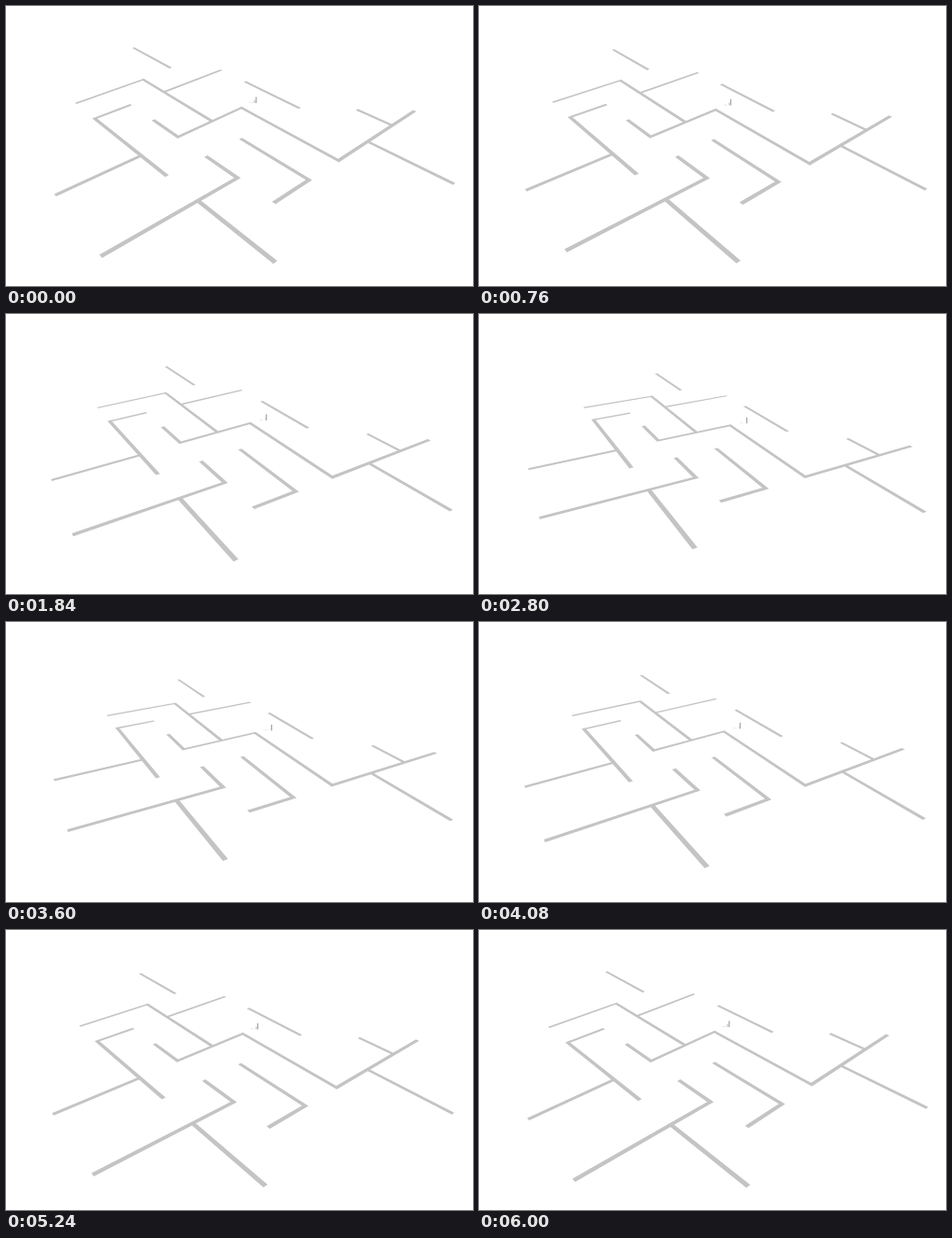
Animation of 500 by 300 pixels, one loop 6.04 s. Source, as an HTML page with a canvas:

```html
<!DOCTYPE html>
<html>
<head>
<meta charset="utf-8">
<style>
html, body { margin: 0; width: 100%; height: 100%; overflow: hidden; background: #fff; }
canvas { display: block; }
</style>
</head>
<body>
<canvas width="500" height="300"></canvas>
<script>
const ctx = document.querySelector('canvas').getContext('2d');
const LOOP = 6040, STEP = 40, HALF = 3000;
const FOCAL = 485, TARGET = 1.78, HALF_WIDTH = 0.045;

// Floor plan in grid units: a start point, then horizontal and vertical runs
const plan = `M3,-8.15v2.05 M0,-6h2v3 M2,-5h2 M1,-5h-1v3 M-1.9,-2.95h1.9
  M1,-4v1h1.95v3h3.05 M5,-1v1 M4,0v2 M4,-4v2 M1,-2v1h-3 M0,-1v2 M2,-2v2h-1`;
const walls = plan.split('M').slice(1).map(run => {
  const [start] = run.match(/^[^hv]+/);
  let [u, v] = start.split(',').map(Number);
  const points = [[u, v]];
  for (const [, axis, length] of run.matchAll(/([hv])([-.\d]+)/g)) {
    if (axis === 'h') u += +length; else v += +length;
    points.push([u, v]);
  }
  return points;
});

// Orbiting camera; returns a floor-to-screen projection
function camera(e) {
  const bow = 4 * e * (1 - e);
  const rad = Math.PI / 180;
  const yaw = (47.5 + 14.6 * e + 0.3 * bow) * rad;
  const pitch = (34.8 - 8.4 * e + 0.8 * bow) * rad;
  const distance = 9.92 + 0.08 * e;
  const cx = 250.5 - e - 3 * bow;
  const cy = 150.4 - 0.4 * e + 2.1 * bow;
  const s = Math.sin(yaw), c = Math.cos(yaw);
  return ([u, v]) => {
    u -= TARGET;
    v += TARGET;
    const right = u * s + v * c, away = u * c - v * s;
    const k = FOCAL / (distance + away * Math.cos(pitch));
    return [cx + right * k, cy - away * Math.sin(pitch) * k];
  };
}

// Adds one wall strip, lengthened at the ends that meet a corner
function addStrip(project, [u1, v1], [u2, v2], joinStart, joinEnd) {
  const len = Math.hypot(u2 - u1, v2 - v1);
  const du = (u2 - u1) / len * HALF_WIDTH, dv = (v2 - v1) / len * HALF_WIDTH;
  if (joinStart) { u1 -= du; v1 -= dv; }
  if (joinEnd) { u2 += du; v2 += dv; }
  ctx.moveTo(...project([u1 - dv, v1 + du]));
  ctx.lineTo(...project([u2 - dv, v2 + du]));
  ctx.lineTo(...project([u2 + dv, v2 - du]));
  ctx.lineTo(...project([u1 + dv, v1 - du]));
  ctx.closePath();
}

function drawFigure([x, y], e) {
  ctx.fillStyle = '#a8a8a8';
  ctx.fillRect(x, y - 5.5, 1.3, 6.5);
  ctx.fillStyle = '#d4d4d4';
  const side = 2 * (1 - e);
  ctx.fillRect(x - side, y - 2, side, 3);
  ctx.fillStyle = '#ebebeb';
  ctx.fillRect(x - 7, y, 4, 1);
}

function draw() {
  const time = Math.floor(performance.now() % LOOP / STEP) * STEP;
  const e = (1 - Math.cos(Math.PI * time / HALF)) / 2;
  const project = camera(e);
  ctx.fillStyle = '#fff';
  ctx.fillRect(0, 0, 500, 300);
  ctx.fillStyle = '#c4c4c4';
  ctx.beginPath();
  for (const points of walls) {
    for (let i = 1; i < points.length; i++) {
      addStrip(project, points[i - 1], points[i], i > 1, i < points.length - 1);
    }
  }
  ctx.fill();
  drawFigure(project([3.41, -2.97]), e);
  requestAnimationFrame(draw);
}
draw();
</script>
</body>
</html>
```
